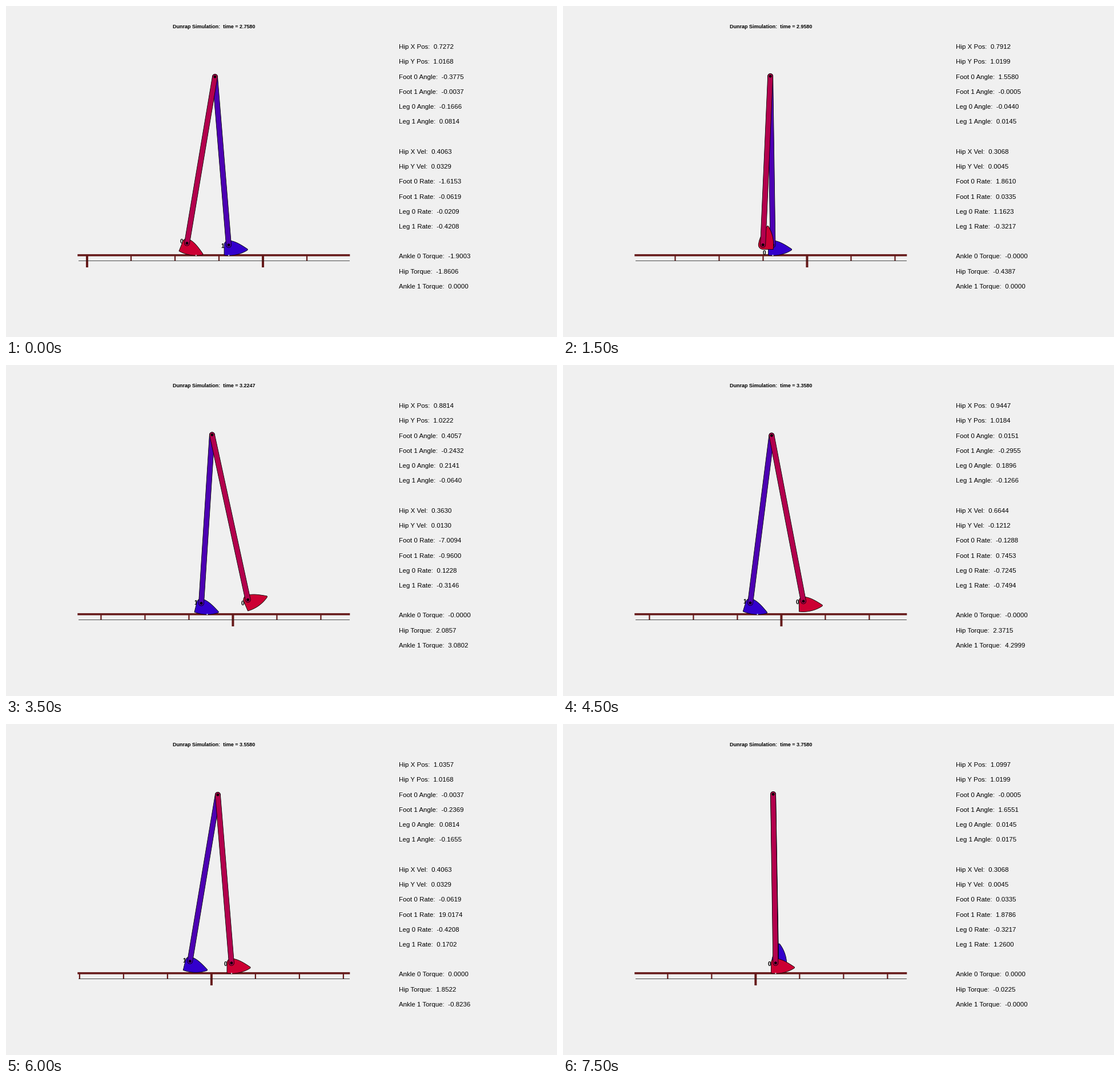
Write a matplotlib script that moves like this. It is 965 by 580 pixels and loops after 8000 ms.

```python
import numpy as np
import matplotlib.pyplot as plt
from matplotlib.animation import FuncAnimation
from matplotlib.patches import Circle, Polygon, Rectangle

W, H, DPI = 965, 580, 100
FRAMES, INTERVAL = 16, 500
DT = 1 / 15                      # simulated seconds per frame
T0 = 2.758

SCALE = 308                      # pixels per metre
GROUND = 437.2
LEG, R, D = 0.96, 0.2, 0.14      # leg length, sole radius, sole centre above ankle
BASE = (1.1136, 0.8051)          # where each foot stands, in metres
SWITCH = 10.5                    # frame time at which the stance foot changes
HIP_SPRING = 7.5

PT = 72 / DPI
MAROON = "#661a1a"
LEG_COLORS = ("#b3004d", "#4d00b3")
FOOT_COLORS = ("#cc0033", "#3300cc")

# One walking cycle, shared by both legs: (phase in frames, foot angle, leg angle)
CYCLE = 23.25
LAG = (0, 12)
GAIT = np.array([
    (0.5, -0.408, -0.167),       # toe leaves the ground
    (1.75, 1.3509, -0.1399),
    (3, 1.558, -0.044),          # mid swing
    (5, 1.7499, 0.1128),
    (7, 0.4057, 0.2141),
    (8, 0.03, 0.219),
    (10, 0.0085, 0.1435),        # heel strike
    (13, -0.0059, 0.0554),
    (15, -0.0005, 0.0145),       # mid stance
    (17, 0.0033, -0.0306),
    (19, -0.2432, -0.064),       # push off
    (20.5, -0.31, -0.105),
    (22, -0.2541, -0.1629),
])

LABELS = ("Hip X Pos", "Hip Y Pos", "Foot 0 Angle", "Foot 1 Angle",
          "Leg 0 Angle", "Leg 1 Angle", None,
          "Hip X Vel", "Hip Y Vel", "Foot 0 Rate", "Foot 1 Rate",
          "Leg 0 Rate", "Leg 1 Rate", None,
          "Ankle 0 Torque", "Hip Torque", "Ankle 1 Torque")


def periodic(t, y):
    """Monotone cubic through one cycle of keys; gives value and rate per second."""
    h = np.diff(np.append(t, t[0] + CYCLE))
    d = np.diff(np.append(y, y[0])) / h
    h0, d0 = np.roll(h, 1), np.roll(d, 1)
    w0, w1 = 2 * h + h0, h + 2 * h0
    m = np.where(d0 * d > 0, (w0 + w1) / (w0 / d0 + w1 / d), 0)

    def at(p):
        p = (p - t[0]) % CYCLE + t[0]
        i = np.searchsorted(t, p, "right") - 1
        j = (i + 1) % len(t)
        s = (p - t[i]) / h[i]
        val = (y[i] + (y[j] - y[i]) * s**2 * (3 - 2 * s)
               + h[i] * s * (1 - s) * (m[i] * (1 - s) - m[j] * s))
        rate = (6 * s * (1 - s) * d[i] + (3*s**2 - 4*s + 1) * m[i]
                + (3*s**2 - 2*s) * m[j])
        return val, rate / DT

    return at


foot_at = periodic(GAIT[:, 0], GAIT[:, 1])
leg_at = periodic(GAIT[:, 0], GAIT[:, 2])


def ankle_torque(p):
    """A long push, cut off by a short pull as the toe lifts."""
    p = (p - 5) % CYCLE + 5
    push = 4.3 * np.exp(-((p - 20.9) / 2.5)**4)
    return push - 3.87 * np.exp(-((p - CYCLE) / 0.7)**2)


def pose(k):
    """Joint angles and rates, with the hip carried by the rolling stance foot."""
    foot = [foot_at(k + lag) for lag in LAG]
    leg = [leg_at(k + lag) for lag in LAG]
    n = 1 if k < SWITCH else 0
    (p, dp), (q, dq) = foot[n], leg[n]
    x = BASE[n] - R * p + D * np.sin(p) - LEG * np.sin(q)
    y = R - D * np.cos(p) + LEG * np.cos(q)
    vx = -R * dp + D * np.cos(p) * dp - LEG * np.cos(q) * dq
    vy = D * np.sin(p) * dp - LEG * np.sin(q) * dq
    return foot, leg, (x, y), (vx, vy)


def foot_outline():
    """Heel, instep, toe and sole in pixels around the ankle, y up."""
    a = np.linspace(np.pi, np.radians(79), 14)
    heel = 7.9 * np.c_[np.cos(a), np.sin(a)]
    t = np.linspace(0, 1, 20)[:, None]
    p = np.array([(1.5, 7.6), (11, 6.7), (20, 1.5), (32.5, -6.8)])
    instep = ((1 - t)**3 * p[0] + 3 * t * (1 - t)**2 * p[1]
              + 3 * t**2 * (1 - t) * p[2] + t**3 * p[3])
    t = np.linspace(0, 1, 7)[:, None]
    toe = ((1 - t)**2 * p[3] + 2 * t * (1 - t) * np.array((34.2, -8))
           + t**2 * np.array((32, -9.5)))
    x = np.linspace(32, -7.9, 30)
    sole = np.c_[x, D * SCALE - np.sqrt((R * SCALE)**2 - x**2)]
    return np.vstack([heel, instep, toe, sole])


def capsule(length, r=4.5):
    a = np.linspace(0, np.pi, 16)
    cap = r * np.c_[np.cos(a), np.sin(a)]
    return np.vstack([cap, -cap - (0, length)])


def place(shape, angle, at):
    """Rotate a y-up shape and move it to a stage point."""
    c, s = np.cos(angle), np.sin(angle)
    x, y = shape[:, 0], shape[:, 1]
    return np.c_[at[0] + c * x - s * y, at[1] - s * x - c * y]


def to_stage(x, y, k):
    return np.array([142 - 7.51 * k + SCALE * x, GROUND - SCALE * y])


FOOT_SHAPE = foot_outline()
LEG_SHAPE = capsule(LEG * SCALE)

plt.rcParams["font.family"] = "Liberation Sans"
fig = plt.figure(figsize=(W / DPI, H / DPI), dpi=DPI, facecolor="#f0f0f0")
ax = fig.add_axes([0, 0, 1, 1])
ax.set_xlim(0, W)
ax.set_ylim(H, 0)
ax.axis("off")


def text(x, y, size, s="", **kw):
    return ax.text(x, y, s, fontsize=size * PT, va="baseline", **kw)


def patch(p, z):
    p.set_zorder(z)
    p.set_snap(False)
    return ax.add_patch(p)


class Limb:
    def __init__(self, n, z):
        edge = dict(ec="black", lw=0.8 * PT, joinstyle="round")
        self.tag = text(0, 0, 10, str(n), ha="center", weight="bold", zorder=z)
        self.foot = patch(Polygon(FOOT_SHAPE, fc=FOOT_COLORS[n], **edge), z + 1)
        self.leg = patch(Polygon(LEG_SHAPE, fc=LEG_COLORS[n], **edge), z + 2)
        self.pins = [patch(Circle((0, 0), 2.4, fc="black", lw=0), z + 3)
                     for _ in range(2)]
        self.contact = patch(Circle((0, 0), 1.1, fc="#cfe8e8", lw=0), 20)

    def update(self, k, hip, phi, theta):
        ankle = (hip[0] + LEG * np.sin(theta), hip[1] - LEG * np.cos(theta))
        top, low = to_stage(*hip, k), to_stage(*ankle, k)
        self.foot.set_xy(place(FOOT_SHAPE, phi, low))
        self.leg.set_xy(place(LEG_SHAPE, theta, top))
        for pin, at in zip(self.pins, (top, low)):
            pin.center = at
        tag = place(np.array([(-12.5, 0)]), phi, low)[0]
        self.tag.set_position(tag + (2, 5.1))
        gap = ankle[1] - R + D * np.cos(phi)
        self.contact.set_visible(abs(phi) < 0.5 and abs(gap) < 0.003)
        self.contact.center = (low[0] - D * SCALE * np.sin(phi), GROUND - 0.3)


ticks = []
for i in range(8):
    w, h = (4, 21) if i % 4 == 0 else (2.2, 10)
    ticks.append(patch(Rectangle((0, 437), w, h, fc=MAROON, lw=0), 1))
ax.plot([127, 601], [445.8, 445.8], color="#222222", lw=0.8 * PT, zorder=2)
patch(Rectangle((125.3, 434.9), 477, 3.6, fc=MAROON, lw=0), 2)

limbs = [Limb(0, 10), Limb(1, 4)]
title = text(292, 39.4, 9, weight="bold")
rows = [(name, text(687.5, 75 + 26.25 * i, 11.45))
        for i, name in enumerate(LABELS) if name]


def draw(k):
    foot, leg, hip, vel = pose(k)
    for i, tick in enumerate(ticks):
        x = to_stage(i / 4, 0, k)[0]
        tick.set_x(x - tick.get_width() / 2)
        tick.set_visible(127.5 < x < 601)
    for limb, (phi, _), (theta, _) in zip(limbs, foot, leg):
        limb.update(k, hip, phi, theta)

    title.set_text(f"Dunrap Simulation:  time = {T0 + k * DT:.4f}")
    angles, rates = zip(*foot, *leg)
    hip_torque = HIP_SPRING * (leg[0][0] - leg[1][0])
    values = [*hip, *angles, *vel, *rates, ankle_torque(k + LAG[0]),
              hip_torque, ankle_torque(k + LAG[1])]
    for (name, row), v in zip(rows, values):
        row.set_text(f"{name}:  {v:.4f}")
    return []


anim = FuncAnimation(fig, draw, frames=FRAMES, interval=INTERVAL,
                     repeat=True, repeat_delay=0, blit=False)
plt.show()
```
